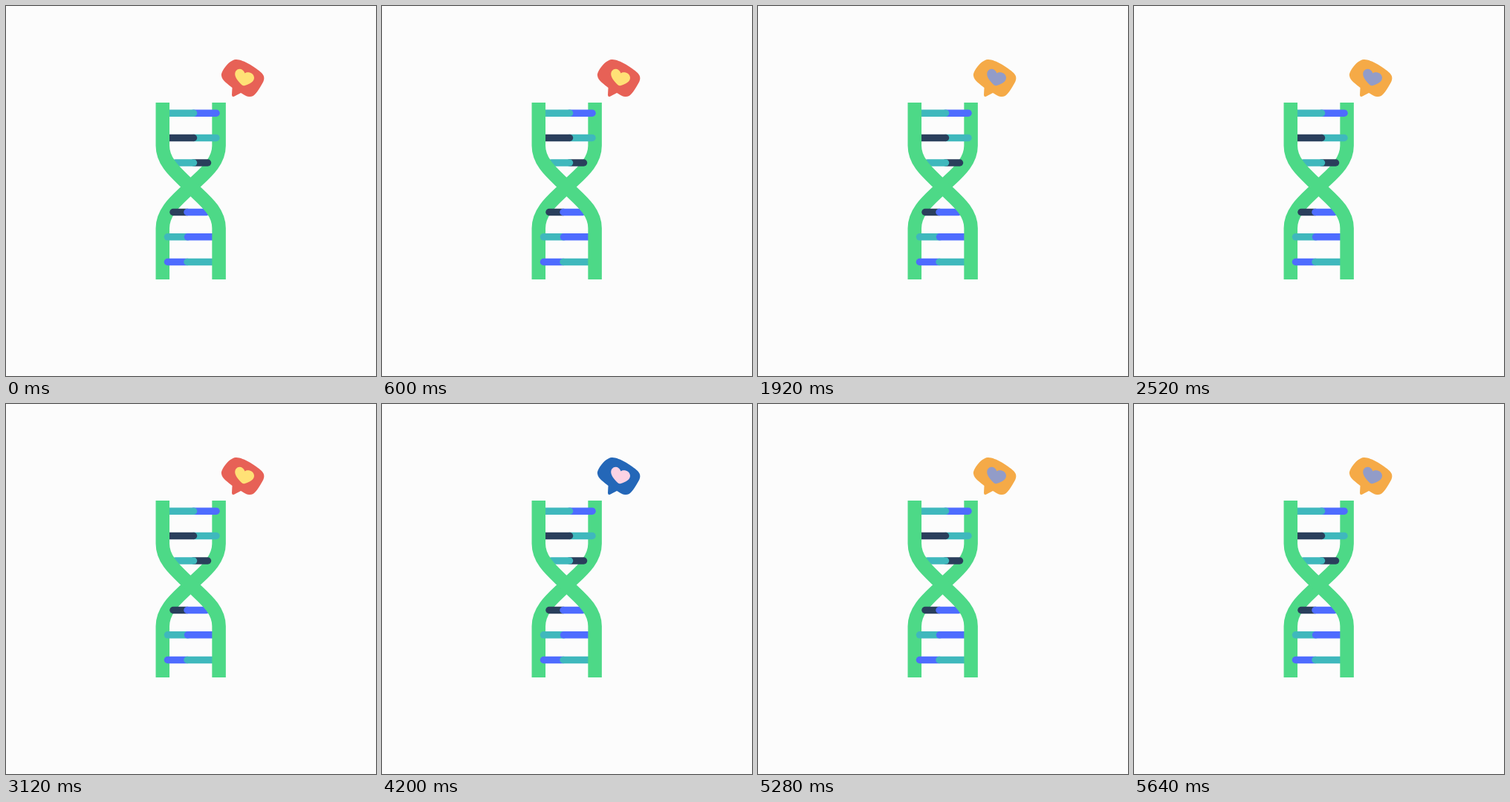
Animation, 498 px wide and 498 px high, one loop 5760 ms. Source, as an HTML page:

```html
<!DOCTYPE html>
<html lang="en">
<head>
<meta charset="utf-8">
<title>DNA with a heart bubble</title>
<style>
  html, body { margin: 0; width: 100%; height: 100%; overflow: hidden; background: #fcfcfc; }
  svg { display: block; width: 100%; height: 100%; }
  .strand { fill: none; stroke: #4dd987; stroke-width: 18.5; }
  #rungs path { fill: none; stroke-width: 9.5; stroke-linecap: round; }
</style>
</head>
<body>
<svg viewBox="0 0 498 498">
  <path class="strand" d="M286.6 130V188C286.6 212 265 227 248.5 243.5C232 260 210.8 275 210.8 299V368"/>
  <g id="rungs"></g>
  <path class="strand" d="M210.8 130V188C210.8 212 232 227 248.5 243.5C265 260 286.6 275 286.6 299V368"/>
  <path id="bubble" d="M290 94C289 88 300 73 309 72C318 71 337 83 344 90C349 95 348 100 344 106C338 116 334 123 327 122C322 121.5 319 118 316 117L307 121.8Q304 123 304 119.500L304.500 110C299 105 291 101 290 94Z"/>
  <path id="heart" d="M321.500 90.500C319 83.500 312 83 309 88C306 94 312 101 317.500 106.300Q319.500 107.900 321.500 107C328 105 334 102 334 96.500C333.500 89.500 325 88 321.500 90.500Z"/>
</svg>
<script>
const TEAL = '#3fb8bd', BLUE = '#4e6cff', NAVY = '#2a3f5c';
const THEMES = [
  { bubble: '#e76156', heart: '#ffe176' },
  { bubble: '#2467b8', heart: '#fcd3e4' },
  { bubble: '#f5aa47', heart: '#929cc8' }
];
const HOLD = 960;

const rungs = document.getElementById('rungs');
const bubble = document.getElementById('bubble');
const heart = document.getElementById('heart');

function addBar(y, from, to, color) {
  const bar = document.createElementNS('http://www.w3.org/2000/svg', 'path');
  bar.setAttribute('d', `M${from} ${y}H${to}`);
  bar.setAttribute('stroke', color);
  rungs.append(bar);
}

// The rounded piece is drawn last so its cap overlaps its neighbour.
function addRung(y, start, join, end, left, right, leftOnTop) {
  const bars = [[y, start, join, left], [y, join, end, right]];
  if (leftOnTop) bars.reverse();
  bars.forEach(bar => addBar(...bar));
}

addRung(144.2, 217, 252.5, 283, TEAL, BLUE, true);
addRung(177.5, 217, 252.5, 283, NAVY, TEAL, true);
addRung(211, 228, 252.5, 271.5, TEAL, NAVY, true);
addRung(277.5, 225, 244, 270, NAVY, BLUE, false);
addRung(310.8, 217.5, 244.5, 280, TEAL, BLUE, false);
addRung(344.5, 217.5, 244, 280, BLUE, TEAL, false);

function render(time) {
  const theme = THEMES[Math.floor(time / HOLD) % THEMES.length];
  bubble.setAttribute('fill', theme.bubble);
  heart.setAttribute('fill', theme.heart);
}

const start = performance.now();
function tick() {
  render(performance.now() - start);
  requestAnimationFrame(tick);
}
tick();
</script>
</body>
</html>
```
